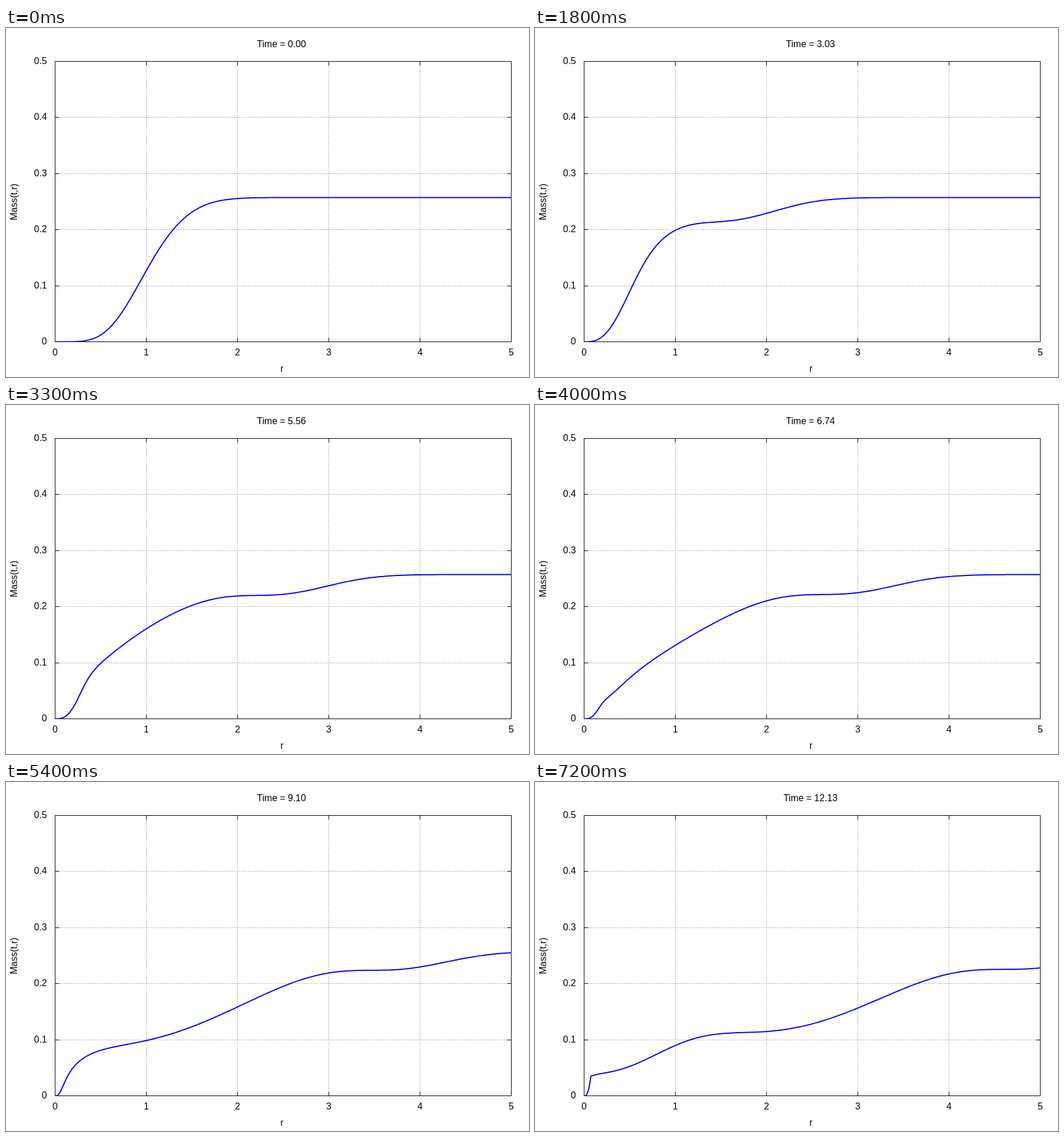
Animation of 900 by 600 pixels, one loop 7.3 s. Source, as an HTML page with a canvas:

```html
<!DOCTYPE html>
<html lang="en">
<head>
<meta charset="utf-8">
<title>Mass(t,r)</title>
<style>
  html, body { margin: 0; width: 100%; height: 100%; overflow: hidden; background: #fff; }
  canvas { display: block; }
</style>
</head>
<body>
<canvas id="stage" width="900" height="600"></canvas>
<script>
// Collapse of a spherical scalar pulse, phi = A exp(-r^2) at rest,
// in polar-areal coordinates on a staggered sinh-spaced grid.
const FRAMES = 73, FRAME_MS = 100, LABEL_STEP = 0.16848;
const AMPLITUDE = 0.337, CLOCK = 0.42;
const SPACING = 0.007, CORE = 0.2, R_MAX = 8;

const cells = Math.ceil(Math.asinh(R_MAX / CORE) / SPACING);
const radius = i => CORE * Math.sinh(SPACING * i);
const array = f => Float64Array.from({ length: cells + 1 }, (_, i) => f(i));

const face = array(radius);
const center = array(i => radius(i + 0.5));
const area = array(i => face[i] ** 2);
const ring = array(i => radius(i + 1) ** 2 - radius(i) ** 2);
const shell = array(i => (radius(i + 1) ** 3 - radius(i) ** 3) / 3);
const zeros = () => new Float64Array(cells + 1);
const mass = zeros(), lapse = zeros(), speed = zeros(), load = zeros();

// Mass is integrated outward, the lapse inward from 1 at the edge.
function solveMetric(grad, mom) {
  for (let i = 0; i < cells; i++) {
    const q = Math.PI * (grad[i] ** 2 + grad[i + 1] ** 2 + 2 * mom[i] ** 2);
    const half = load[i] = q * ring[i] / 2;
    mass[i + 1] = (mass[i] * (1 - half) + q * shell[i]) / (1 + half);
  }
  lapse[cells] = 1;
  for (let i = cells - 1; i >= 0; i--) lapse[i] = lapse[i + 1] * Math.exp(-2 * load[i]);
  speed[0] = lapse[0];
  for (let i = 1; i <= cells; i++) speed[i] = lapse[i] * Math.max(0, 1 - 2 * mass[i] / face[i]);
}

function derive(grad, mom, dGrad, dMom) {
  solveMetric(grad, mom);
  let before = 0;
  for (let i = 0; i < cells; i++) {
    const flux = (speed[i] + speed[i + 1]) / 2 * mom[i];
    if (i) dGrad[i] = (flux - before) / (center[i] - center[i - 1]);
    before = flux;
    dMom[i] = (area[i + 1] * speed[i + 1] * grad[i + 1] - area[i] * speed[i] * grad[i]) / shell[i];
  }
}

function simulate() {
  const grad = array(i => i < cells ? -2 * AMPLITUDE * face[i] * Math.exp(-area[i]) : 0);
  const mom = zeros(), g = zeros(), p = zeros(), dg = zeros(), dp = zeros();
  const sumG = zeros(), sumP = zeros();

  function rungeKutta(dt) {
    g.set(grad); p.set(mom); sumG.fill(0); sumP.fill(0);
    for (let stage = 0; stage < 4; stage++) {
      derive(g, p, dg, dp);
      const weight = stage % 3 ? dt / 3 : dt / 6;
      const reach = stage < 2 ? dt / 2 : dt;
      for (let i = 0; i < cells; i++) {
        sumG[i] += weight * dg[i];
        sumP[i] += weight * dp[i];
        g[i] = grad[i] + reach * dg[i];
        p[i] = mom[i] + reach * dp[i];
      }
    }
    for (let i = 0; i < cells; i++) { grad[i] += sumG[i]; mom[i] += sumP[i]; }
  }

  const history = [], span = LABEL_STEP * CLOCK;
  for (let n = 0; n < FRAMES; n++) {
    solveMetric(grad, mom);
    history.push(Float32Array.from(mass));
    let rate = 0;
    for (let i = 0; i < cells; i++) rate = Math.max(rate, speed[i] / (face[i + 1] - face[i]));
    const steps = Math.ceil(span * rate / 0.7);
    for (let s = 0; s < steps; s++) rungeKutta(span / steps);
  }
  return history;
}

const ctx = document.getElementById('stage').getContext('2d');
const LEFT = 84, RIGHT = 869, TOP = 57, BOTTOM = 539;
const xAt = r => LEFT + 157 * r;
const yAt = m => BOTTOM - 964 * m;

function line(x1, y1, x2, y2) {
  ctx.beginPath();
  ctx.moveTo(x1 + 0.5, y1 + 0.5);
  ctx.lineTo(x2 + 0.5, y2 + 0.5);
  ctx.stroke();
}

function text(label, x, y, align = 'center') {
  ctx.textAlign = align;
  ctx.fillText(label, x, y);
}

function drawAxes() {
  ctx.lineWidth = 1;
  ctx.fillStyle = '#000';
  ctx.font = '16px "Liberation Sans", Arial, sans-serif';
  for (let i = 0; i <= 5; i++) {
    const x = xAt(i), y = Math.round(yAt(i / 10));
    if (i % 5) {
      ctx.strokeStyle = '#a0a0a0';
      ctx.setLineDash([2, 2]);
      line(x, BOTTOM, x, TOP);
      line(LEFT, y, RIGHT, y);
      ctx.setLineDash([]);
      ctx.strokeStyle = '#000';
      line(x, BOTTOM, x, BOTTOM - 7);
      line(x, TOP, x, TOP + 7);
      line(LEFT, y, LEFT + 7, y);
      line(RIGHT, y, RIGHT - 7, y);
    }
    text(i, x + 0.5, 563);
    text(i ? (i / 10).toFixed(1) : '0', 70.5, y + 5, 'right');
  }
  ctx.strokeStyle = '#000';
  ctx.strokeRect(LEFT + 0.5, TOP + 0.5, RIGHT - LEFT, BOTTOM - TOP);
  text('r', 475, 591);
  ctx.save();
  ctx.translate(19, 299);
  ctx.rotate(-Math.PI / 2);
  text('Mass(t,r)', 0, 0);
  ctx.restore();
}

function drawCurve(profile) {
  ctx.save();
  ctx.beginPath();
  ctx.rect(LEFT - 1, TOP, RIGHT - LEFT + 2, BOTTOM - TOP + 1);
  ctx.clip();
  ctx.strokeStyle = '#00f';
  ctx.lineWidth = 2;
  ctx.lineJoin = 'round';
  ctx.beginPath();
  profile.forEach((m, i) => ctx.lineTo(xAt(face[i]) + 0.5, yAt(m) + 0.5));
  ctx.stroke();
  ctx.restore();
}

const history = simulate();
const start = performance.now();

function draw() {
  const n = Math.floor((performance.now() - start) / FRAME_MS) % FRAMES;
  ctx.fillStyle = '#fff';
  ctx.fillRect(0, 0, 900, 600);
  drawAxes();
  text('Time = ' + (n * LABEL_STEP).toFixed(2), 474, 33);
  drawCurve(history[n]);
  requestAnimationFrame(draw);
}
draw();
</script>
</body>
</html>
```
